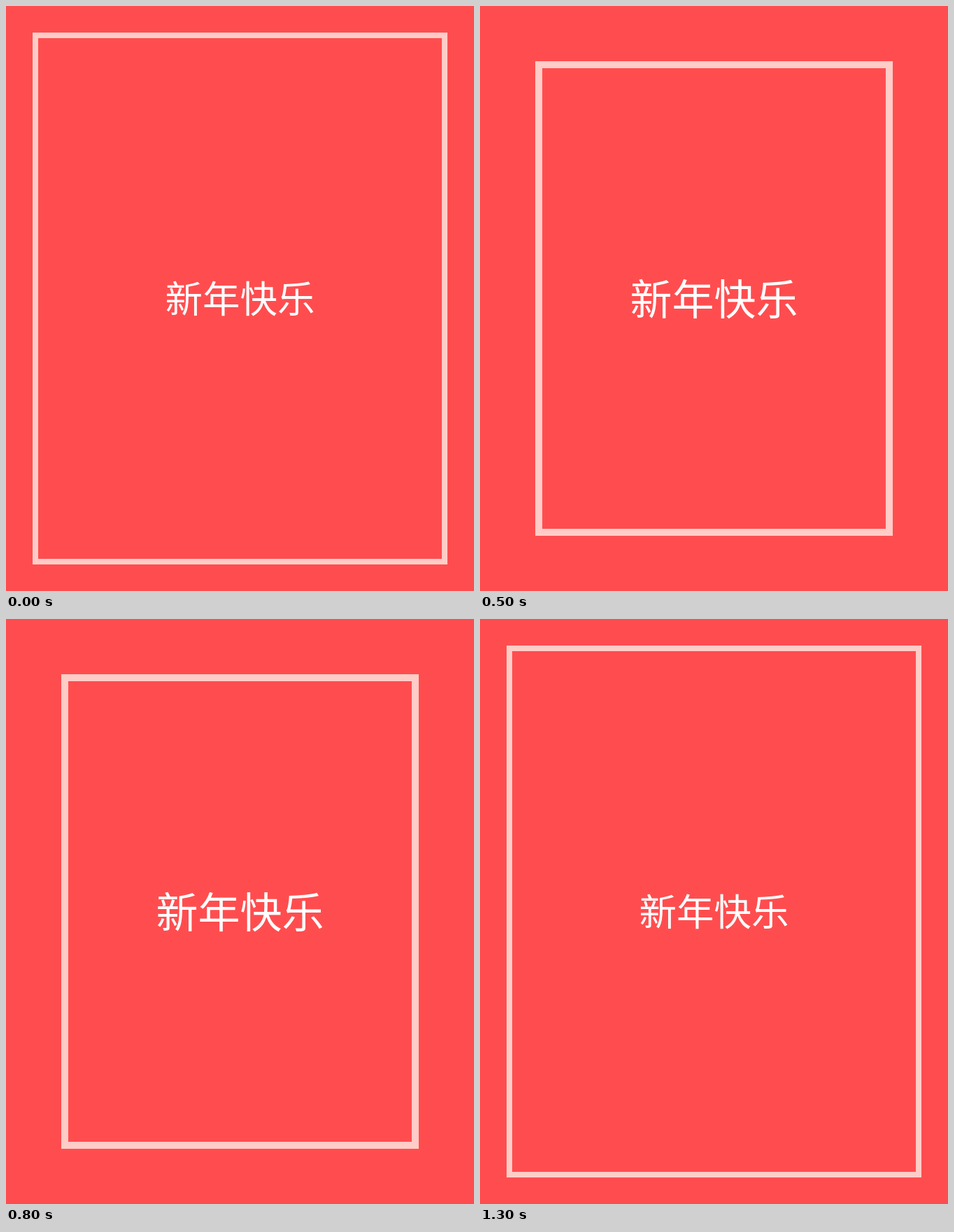
Recreate the animation shown at these times as an HTML page with a canvas. Size 669x837 px, loop 1500 ms.

```html
<!DOCTYPE html>
<html lang="zh-CN">
<meta charset="utf-8">
<style>
  html, body { margin: 0; overflow: hidden; background: #ff4d4f; }
  canvas { display: block; }
</style>
<canvas width="669" height="837"></canvas>
<script>
const canvas = document.querySelector('canvas');
const ctx = canvas.getContext('2d');
const { width, height } = canvas;

const wide = { inset: 38, line: 8, size: 53.5, baseline: 439 };
const tight = { inset: 79, line: 10, size: 60, baseline: 441.5 };
const poses = [wide, tight, wide];
const STEP = 500;

function draw({ inset, line, size, baseline }) {
  ctx.fillStyle = '#ff4d4f';
  ctx.fillRect(0, 0, width, height);

  const edge = inset + line / 2;
  ctx.strokeStyle = '#ffccc7';
  ctx.lineWidth = line;
  ctx.strokeRect(edge, edge, width - 2 * edge, height - 2 * edge);

  ctx.fillStyle = '#fff';
  ctx.font = `${size}px "Noto Sans CJK SC", "Noto Sans CJK", sans-serif`;
  ctx.textAlign = 'center';
  ctx.fillText('新年快乐', width / 2, baseline);
}

function tick() {
  draw(poses[Math.floor(performance.now() / STEP) % poses.length]);
  requestAnimationFrame(tick);
}
tick();
</script>
</html>
```
